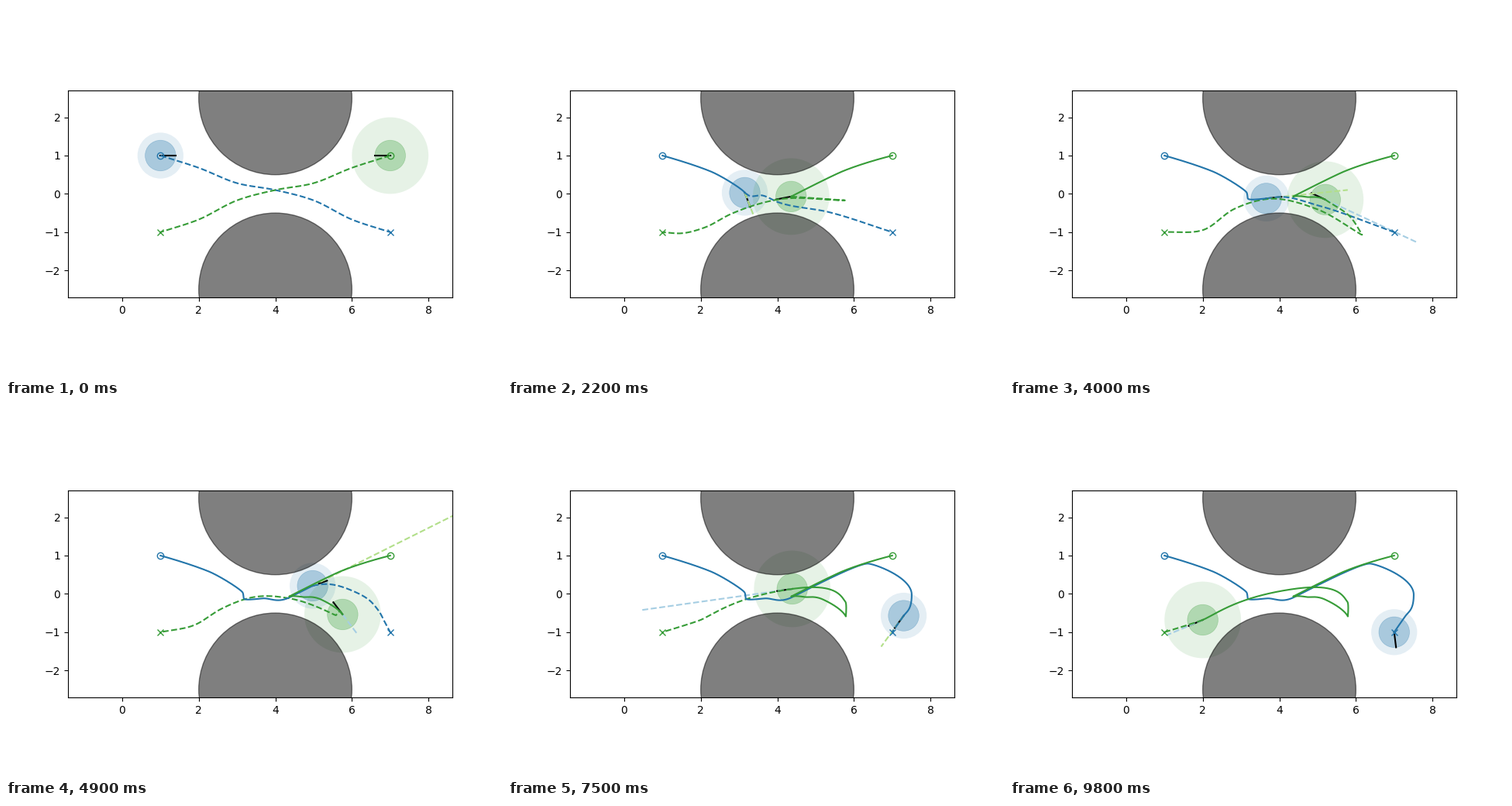
A matplotlib script for the animation above (9.9 s loop, 640 px wide and 480 px high).

```python
import numpy as np
import matplotlib.pyplot as plt
from matplotlib.animation import FuncAnimation
from matplotlib.patches import Circle

FRAMES, INTERVAL = 99, 100
SAMPLES = 140
HORIZON = 20  # frames a constant-velocity forecast looks ahead
NOSE = 0.4


def hermite(u, knots, values, slopes):
    """Piecewise cubic through values with the given slopes at the knots."""
    u = np.atleast_1d(u)
    i = np.clip(np.searchsorted(knots, u, side="right") - 1, 0, len(knots) - 2)
    h = (knots[i + 1] - knots[i])[:, None]
    w = (u - knots[i])[:, None] / h
    return (values[i] + (values[i + 1] - values[i]) * (3 - 2 * w) * w**2
            + h * w * (1 - w) * (slopes[i] * (1 - w) - slopes[i + 1] * w))


def arc_length(points):
    steps = np.hypot(*np.diff(points, axis=0).T)
    return np.concatenate([[0], np.cumsum(steps)])


def smooth(points):
    pts = np.array(points, float)
    knots = arc_length(pts)
    u = np.linspace(0, knots[-1], SAMPLES)
    return hermite(u, knots, pts, np.gradient(pts, knots, axis=0))


def resample(points):
    lengths = arc_length(points)
    s = np.linspace(0, lengths[-1], SAMPLES)
    return np.column_stack([np.interp(s, lengths, axis) for axis in points.T])


def unit(degrees):
    a = np.radians(degrees)
    return np.stack([np.cos(a), np.sin(a)], axis=-1)


class Agent:
    """Drives through poses (frame, x, y, heading, speed); speed < 0 reverses."""

    def __init__(self, goal, poses, plans):
        poses = np.array(poses, float)
        self.times, self.headings = poses[:, 0], poses[:, 3]
        self.spots = poses[:, 1:3]
        self.speeds = poses[:, 4:] * unit(self.headings)
        self.goal = goal
        self.plans = [(t, self.route(t, *legs)) for t, *legs in plans]

    def at(self, t):
        return hermite(t, self.times, self.spots, self.speeds)

    def route(self, t, ahead, back):
        """Drive ahead, and if `back` is given turn sharply and go on through it."""
        start = tuple(self.at(t)[0])
        if back is None:
            return resample(smooth([start, *ahead, self.goal]))
        legs = smooth([start, *ahead]), smooth([ahead[-1], *back, self.goal])
        return resample(np.vstack(legs))

    def history(self, t):
        return self.at(np.linspace(0, t, 10 * t + 2))

    def remaining(self, t):
        return resample(self.at(np.linspace(t, self.times[-1], 400)))

    def plan(self, t, settled):
        """Blend neighbouring plans; from `settled` on, follow the real path."""
        if t >= settled:
            return self.remaining(t)
        keys = self.plans + [(settled, self.remaining(settled))]
        i = sum(key[0] <= t for key in keys) - 1
        (t0, a), (t1, b) = keys[i:i + 2]
        pts = a + (b - a) * (t - t0) / (t1 - t0)
        fade = (1 - np.linspace(0, 1, SAMPLES)[:, None]) ** 6
        return pts + (self.at(t) - pts[0]) * fade

    def ray(self, t, vector):
        start = self.at(t)[0]
        return np.array([start, start + vector])

    def nose(self, t):
        return self.ray(t, NOSE * unit(np.interp(t, self.times, self.headings)))

    def forecast(self, t, eps=0.01):
        velocity = (self.at(t + eps) - self.at(t - eps))[0] / (2 * eps)
        return self.ray(t, HORIZON * velocity)


# First idea: both cross the gap on mirrored curves.
crossing = [(2, .68), (3, .28), (4, .1), (5, -.17), (6, -.67)]

blue = Agent(
    goal=(7, -1),
    poses=[(0, 1, 1, 0, 0), (14, 2.25, .59, -22, .12), (22, 3.15, .03, -69, .03),
           (40, 3.66, -.12, 6, .107), (46, 4.4, -.08, 27, .2),
           (58, 6.37, .79, -3, .06), (67, 7.51, -.02, -90, .15),
           (75, 7.3, -.57, -126, .05), (86, 7, -1, -83, 0), (98, 7, -1, -83, 0)],
    plans=[(0, crossing, None),
           (14, [(3.5, .03), (5.2, -.4), (6.4, -1.1), (7.5, -1.43), (8.44, -1.27)], []),
           (22, [(3.27, -.05), (3.6, -.04), (4, -.21), (5.36, -.48)], None),
           (40, [(4.05, -.08), (5, -.3)], None)])

green = Agent(
    goal=(1, -1),
    poses=[(0, 7, 1, 180, 0), (14, 5.73, .6, 202, .13), (22, 4.36, -.07, 191, 0),
           (34, 4.7, -.08, 170, -.06), (40, 5.2, -.15, 155, -.131),
           (53, 5.79, -.59, 115, 0), (58, 5.78, -.21, 125, .04),
           (75, 4.39, .13, 188, .198), (98, 2, -.68, 203, .05),
           (108, 1, -1, 200, 0)],
    plans=[(0, [(8 - x, y) for x, y in crossing[::-1]][::-1], None),
           (14, [(4, -.1), (2.5, -.55), (1.3, -1.22), (.1, -1.51), (-1.21, -1.1)], []),
           (22, [(5.77, -.17)], [(4, -.15), (2.8, -.52), (2.1, -.88), (1.5, -1.03)]),
           (40, [(5.87, -.62), (6.17, -1.08)],
            [(4.96, -.39), (3.74, -.13), (2.83, -.39), (2.02, -.94)]),
           (58, [(5.16, .07), (3.54, .13), (1.82, -.66)], None)])

# agent, line colour, forecast colour, safety radius, frame its plan is settled
TEAM = [(blue, "#2275aa", "#b2df8a", 0.6, 58),
        (green, "#369c37", "#a6cee3", 1.0, 75)]

fig, ax = plt.subplots(figsize=(6.4, 4.8), dpi=100)
ax.set_aspect("equal")
ax.set_xlim(-1.415, 8.625)
ax.set_ylim(-2.7, 2.7)
ax.set_xticks(range(0, 9, 2))
ax.set_yticks(range(-2, 3))


def line(color, style, z):
    return ax.plot([], [], style, color=color, lw=1.5, zorder=z)[0]


sprites = []
for agent, color, pale, radius, settled in TEAM:
    discs = [ax.add_patch(Circle((0, 0), r, color=color, alpha=a, lw=w))
             for r, a, w in ((radius, 0.12, 0), (0.4, 0.3, 0.5))]
    sprites.append((agent, settled, discs, line("black", "-", 2),
                    line(pale, "--", 2.1), line(color, "--", 2.2),
                    line(color, "-", 2.3)))
    for spot, marker in ((agent.spots[0], "o"), (agent.goal, "x")):
        ax.plot(*spot, marker, color=color, fillstyle="none", zorder=2.4)

for y in (2.5, -2.5):
    ax.add_patch(Circle((4, y), 2, color="black", alpha=0.5))


def update(t):
    for agent, settled, discs, nose, forecast, plan, trail in sprites:
        for disc in discs:
            disc.center = agent.at(t)[0]
        nose.set_data(*agent.nose(t).T)
        forecast.set_data(*agent.forecast(t).T)
        plan.set_data(*agent.plan(t, settled).T)
        trail.set_data(*agent.history(t).T)
    return []


anim = FuncAnimation(fig, update, frames=FRAMES, interval=INTERVAL,
                     repeat=True, repeat_delay=0, blit=False)
plt.show()
```
